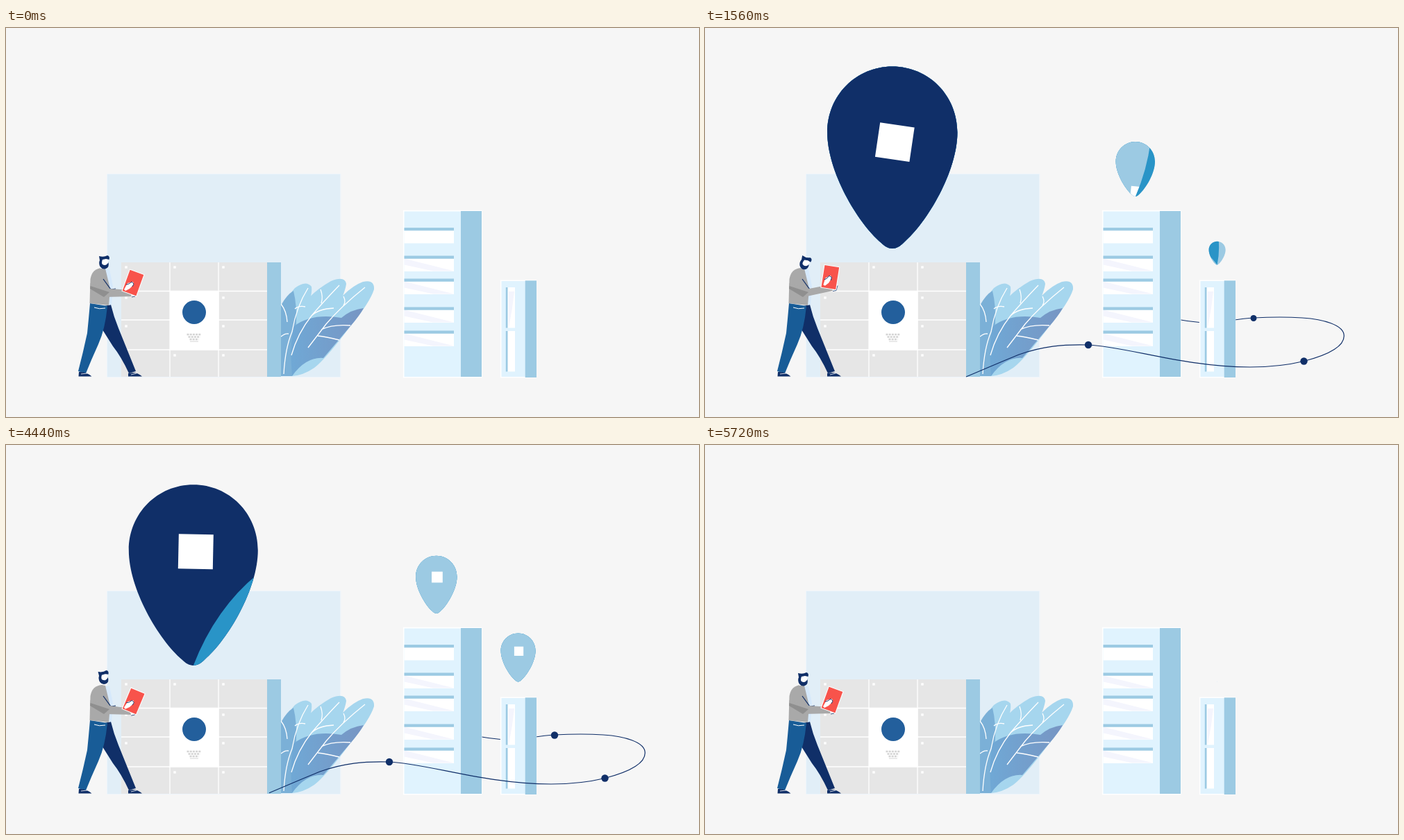
Recreate the animation shown at these times as an HTML page with a canvas. Size 998 by 561 pixels, loop 5.76 s.

```html
<!DOCTYPE html>
<html lang="en">
<head>
<meta charset="utf-8">
<title>Locker delivery</title>
<style>
html, body { margin: 0; width: 100%; height: 100%; overflow: hidden; background: #f6f6f6; }
canvas { display: block; }
</style>
</head>
<body>
<canvas width="998" height="561"></canvas>
<script>
const c = document.querySelector('canvas').getContext('2d');
const LOOP = 5760;
const NAVY = '#102f68', BLUE = '#2994c7', SKY = '#9ccae3', PALE = '#e0f3fe';

const ramp = (t, start, length) => Math.min(1, Math.max(0, (t - start) / length));
const outQuad = u => 1 - (1 - u) ** 2;
const inOutQuad = u => u < .5 ? 2 * u * u : 1 - 2 * (1 - u) ** 2;
const sine = u => (1 - Math.cos(Math.PI * u)) / 2;
const rad = deg => deg * Math.PI / 180;

function keys(t, list) {
  let value = list[0][1];
  for (let i = 1; i < list.length; i++) {
    const [t0, a] = list[i - 1], [t1, b] = list[i];
    if (t >= t0) value = a + (b - a) * sine(ramp(t, t0, t1 - t0));
  }
  return value;
}

function box(color, x, y, w, h) {
  c.fillStyle = color;
  c.fillRect(x, y, w, h);
}
function shape(color, d) {
  c.fillStyle = color;
  c.fill(new Path2D(d));
}
function line(color, width, d) {
  c.strokeStyle = color;
  c.lineWidth = width;
  c.stroke(new Path2D(d));
}
function dot(color, x, y, r) {
  c.fillStyle = color;
  c.beginPath();
  c.arc(x, y, r, 0, 7);
  c.fill();
}
function group(draw) {
  c.save();
  draw();
  c.restore();
}

// Route: the near half runs in front of the buildings, the far half behind them.
const NEAR = 'M376 503C400 493 425 482 452 471C486 459 515 456 552 457C610 460 690 489 785 489C815 489 840 486 862.5 480.5C897 471.5 920.3 460 920.3 444';
const FAR = 'M920.3 444C920.3 428 890 420 860 418C838 416.5 810 417 790 418C760 420 730 427 712 424.5C700 423.5 690 422 682 420.5';
function pathLength(d) {
  const p = document.createElementNS('http://www.w3.org/2000/svg', 'path');
  p.setAttribute('d', d);
  return p.getTotalLength();
}
const nearLength = pathLength(NEAR), routeLength = nearLength + pathLength(FAR);

function route(t, d, offset) {
  const end = routeLength * inOutQuad(ramp(t, 562, 1011)) - offset;
  const start = Math.max(0, routeLength * sine(ramp(t, 4390, 1260)) - offset);
  if (end <= start) return;
  group(() => {
    c.setLineDash([end - start, 9999]);
    c.lineDashOffset = -start;
    line(NAVY, 1.2, d);
  });
}

const STOPS = [[552, 457, 1000, 4680], [862.5, 480.5, 1250, 5080], [790, 418.5, 1400, 5250]];
function stops(t) {
  for (const [x, y, show, hide] of STOPS)
    dot(NAVY, x, y, 5.2 * (outQuad(ramp(t, show, 260)) - sine(ramp(t, hide, 260))));
}

function lockers() {
  box('#e1eef7', 146, 211, 335.5, 292);
  line('#eef5fb', 1, 'M145.5 503.5V210.5H482V503.5z');
  box('#e6e6e6', 166, 338, 210, 165);
  line('#fff', 1.3, 'M236 338V503M306 338V503M166 379.5H376M166 421H376M166 464H376');
  box('#fff', 236, 379, 70.5, 85.5);
  for (const x of [173, 243, 313])
    for (const y of [345, 389, 430, 472])
      if (x !== 243 || y < 350 || y > 450) box('#fff', x - 1.7, y - 1.7, 3.4, 3.4);
  dot('#235f9c', 271, 410, 17);
  group(() => {
    c.setLineDash([3, 1.2]);
    line('#d4d4d4', 2.4, 'M260.5 442H281.5M262.5 445.5H279.5M264.5 449H277.5');
  });
  line('#d4d4d4', 1, 'M265 452H277');
}

function plant() {
  const light = '#a6d6ee';
  shape(light, 'M396 502V410Q404 388 416 375Q432 363 440 373Q442 388 428 412L412 502z');
  shape(light, 'M412 502L414 420Q432 385 468 365Q488 357 490 369Q488 385 470 416L440 480z');
  shape(light, 'M412 502L455 425Q486 376 514 366Q531 362 530 377Q524 396 496 430Q460 478 444 490Q428 501 412 502z');
  shape('#7bb0d7', 'M396 400Q404 385 414 379Q419 400 418 425L412 502H396z');
  const shade = c.createLinearGradient(412, 0, 515, 0);
  shade.addColorStop(0, '#70a8d5');
  shade.addColorStop(1, '#7795c3');
  shape(shade, 'M412 502Q408 455 415 430Q440 411 483 418Q497 406 515 404Q509 415 496 430L457 476Q432 474 412 502z');
  line('#fff', 1.3, 'M400 499Q402 462 412 438Q418 402 435 375M396 398Q404 408 405 424M396 445Q402 440 407 441M416 405Q422 400 431 402' +
    'M480 371Q455 397 440 415Q420 440 411 472M453 377Q457 388 454 397M440 415Q450 405 472 404' +
    'M517 374Q482 402 461 427L435 461M486 387Q490 395 486 400M454 435Q470 427 496 429M449 444Q460 445 480 450');
  box(SKY, 376, 338, 20, 165);
}

function buildings() {
  box('#fff', 571.8, 262.8, 113.7, 241.7);
  box(PALE, 573.5, 264.5, 82, 238.5);
  box(SKY, 655, 264, 30, 239);
  for (const y of [288, 328.5, 361.5, 402.5, 436.5]) {
    box('#fff', 573.5, y + 4, 71.5, 18.5);
    if (y > 288) shape('#f4f5fd', `M573.5 ${y + 4}L645 ${y + 22}H615L573.5 ${y + 13}z`);
    box(SKY, 573.5, y, 71.5, 4.2);
  }
  box('#fff', 711.8, 363.4, 52.4, 141.1);
  box(PALE, 713.5, 365, 35, 138);
  box(SKY, 747.7, 364.3, 16.3, 139.7);
  for (const y of [374, 437]) {
    box('#fff', 722, y, 11, 58.5);
    box(SKY, 719.8, y, 2.7, 58.5);
  }
  shape('#f4f5fd', 'M724 380H732L729 404L724 432z');
}

function man(t) {
  // look: 0 = reading upright, 1 = leaning in with the tablet raised
  const look = keys(t, [[0, 0], [900, 1], [1800, 1], [2600, -.25], [4400, -.25], [5600, 0]]);
  shape(NAVY, 'M137 402L151 399Q155 416 162 433L187 495L177 498Q166 474 154 459L137 432z');
  shape('#185c97', 'M121 397L146 401Q143 434 133 456Q123 478 115 498L104 495Q111 468 117 440Q119 420 121 397z');
  line('#fff', 1, 'M127 403Q134 406 143 404');
  shape(NAVY, 'M105 496Q115 495 123.5 502.5H104.5zM176 498Q188 495 196 502.5H176z');
  line('#fff', .8, 'M108 499L117 498M180 500L188 498');

  shape('#d6e9fb', 'M141 347L149 348L154 372L152 399L146 400z');
  shape('#a9a9a9', 'M121.5 362Q124 347 138 346L143 347L150 376L148 400L120.5 397z');
  line(NAVY, 1.2, 'M140 362L151 377L158 376');

  group(() => {
    c.translate(140, 346 + 10 * Math.min(look, 0));
    c.rotate(rad(20 * look));
    shape('#fff', 'M-4 -14H7V-4L3 1H-4z');
    shape(NAVY, 'M-6 -17Q1 -15 6 -18Q10 -17 8.5 -12L4 -13L-1 -12Q-3 -7 -1 -5Q4 -2 7.5 -8Q9 -1 4 1Q-1 3 -4.5 -2Q-7 -7 -5 -11z');
  });

  const hx = 183 + 3 * look, hy = 384 - 8.5 * look;
  shape('#a9a9a9', `M121.5 368L150 376L${hx - 3} ${hy - 6}L${hx} ${hy + 3}L142 388L121 376z`);
  shape('#8f8f8f', 'M121.5 372L149 381L141 388L121 376z');
  shape('#fff', `M${hx - 4} ${hy - 5}L${hx + 5} ${hy - 6}L${hx + 4} ${hy + 3}L${hx - 2} ${hy + 4}z`);
  line(NAVY, .8, `M${hx - 2} ${hy + 4}L${hx + 3} ${hy + 3}L${hx + 5} ${hy - 4}`);

  group(() => {
    c.translate(183 - 2.7 * look, 367.5 - 8 * look);
    c.rotate(rad(20 - 11 * look));
    box('#fff', -11.5, -17, 23, 34);
    box('#f8534b', -10.5, -16, 21, 32);
  });
  group(() => {
    c.translate(177 - look, 371 - 8 * look);
    c.rotate(rad(-12 * look));
    shape('#fff', 'M-7 6L-2 -3L6 -5L7 -1L1 5L-5 8z');
    line(NAVY, .9, 'M-4 -1L0 -2L4 -5L7 -2L5 2');
  });
}

const PIN = new Path2D('M0 0C-6 0-11-3-16-8C-51-38-94-112-94-168C-94-222-52-263.5 0-263.5C52-263.5 94-222 94-168C94-112 51-38 16-8C11-3 6 0 0 0z');
const PINS = [
  { x: 269.8, y: 318, size: 1, color: NAVY, show: 620, grow: 1000, cover: 955, hide: 4400 },
  { x: 619.8, y: 243, size: .316, color: SKY, show: 940, grow: 800, cover: 1250, hide: 4690 },
  { x: 737.6, y: 341.5, size: .266, color: SKY, show: 1300, grow: 930, cover: 1500, hide: 5140 }
];

// Sweeps a curved edge around the pin's tip and paints what lies behind it.
function sweep(u, side, bow, paint) {
  if (u <= 0) return;
  group(() => {
    if (u < 1) {
      const m = new DOMMatrix().scale(side, 1).rotate(-60 + 120 * u);
      const edge = new Path2D();
      edge.addPath(new Path2D(`M0 0Q${bow}-150 0-300V-600H-900V400H0z`), m);
      c.clip(edge);
    }
    paint();
  });
}

function pin(t, p) {
  const leaving = t > p.hide;
  const left = 1 - sine(ramp(t, p.hide, 620));
  const scale = leaving ? left : outQuad(ramp(t, p.show, p.grow));
  if (scale < .002) return;
  const flood = color => () => box(color, -100, -270, 200, 280);
  const face = () => {
    flood(p.color)();
    const rise = leaving ? left : sine(ramp(t, p.cover + 195, 500));
    c.scale(1 / scale, 1 / scale);
    c.translate(3.5, -166 * rise);
    c.rotate(rad(110 * (1 - rise)));
    if (rise > 0) box('#fff', -25, -25, 50, 50);
  };
  group(() => {
    c.translate(p.x, p.y);
    c.scale(p.size * scale, p.size * scale);
    c.clip(PIN);
    if (leaving) {
      group(face);
      sweep(ramp(t, p.hide, 460), -1, 80, flood(BLUE));
      sweep(ramp(t, p.hide + 250, 380), -1, 80, flood(p.color));
    } else {
      flood(p.color)();
      sweep(ramp(t, p.show, 500), 1, 24, flood(BLUE));
      sweep(ramp(t, p.cover, 500), 1, 24, face);
    }
  });
}

function frame() {
  const t = performance.now() % LOOP;
  box('#f6f6f6', 0, 0, 998, 561);
  lockers();
  plant();
  route(t, FAR, nearLength);
  buildings();
  route(t, NEAR, 0);
  stops(t);
  for (const p of PINS) pin(t, p);
  man(t);
  requestAnimationFrame(frame);
}
frame();
</script>
</body>
</html>
```
